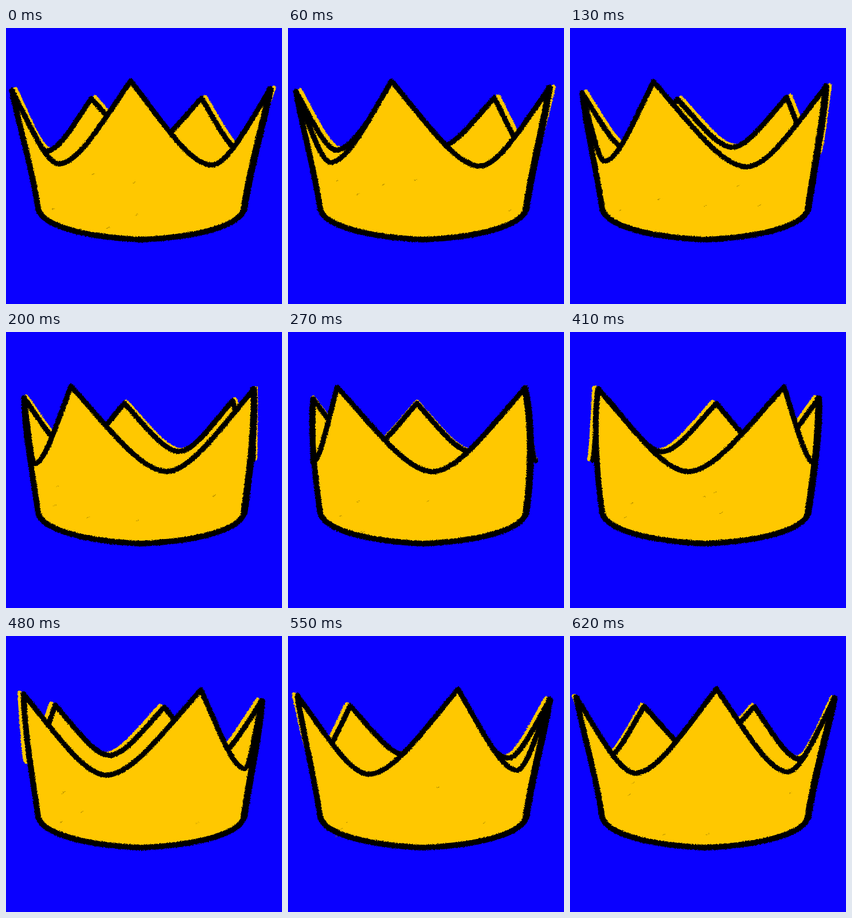
Recreate the animation shown at these times as an HTML page. Size 480 by 480 pixels, loop 680 ms.

```html
<!DOCTYPE html>
<html lang="en">
<head>
<meta charset="utf-8">
<title>Turning crown</title>
<style>
  html, body { margin: 0; width: 100%; height: 100%; overflow: hidden; background: #0a00ff; }
  svg { display: block; width: 100%; height: 100%; }
  path { fill: none; stroke: #000; stroke-width: 9; stroke-linecap: round; stroke-linejoin: round; }
  .gold { fill: #ffc800; stroke: none; }
  #smear { stroke: #ffc800; stroke-width: 8; }
  #skirt { stroke-width: 10; }
  #shade { stroke-width: 12; }
  #specks { stroke: #8a6c00; stroke-width: 0.7; }
</style>
</head>
<body>
<svg viewBox="0 0 480 480">
  <filter id="crayon" x="0" y="0" width="480" height="480" filterUnits="userSpaceOnUse" color-interpolation-filters="sRGB">
    <feTurbulence id="grain" type="fractalNoise" baseFrequency="0.45" numOctaves="2" result="noise"/>
    <feDisplacementMap in="SourceGraphic" in2="noise" scale="4" xChannelSelector="R" yChannelSelector="G"/>
  </filter>
  <rect width="480" height="480" fill="#0a00ff"/>
  <g filter="url(#crayon)">
    <path id="smear"/>
    <path id="backFill" class="gold"/>
    <path id="backRim"/>
    <path id="frontFill" class="gold"/>
    <path id="frontRim"/>
    <path id="skirt"/>
    <path id="shade"/>
    <path id="specks"/>
  </g>
</svg>
<script>
const LOOP = 680;
const STEP = 70;          // time per drawing
const FIRST_CUT = 60;     // the first drawing is shorter
const DRAWINGS = 10;
const PEAKS = 5;
const GAP = 2 * Math.PI / PEAKS;
const CENTER = 235;
const RADIUS = 225;
const RAD = Math.PI / 180;

const el = id => document.getElementById(id);
const mix = (a, b, k) => a + (b - a) * k;
const setPath = (id, d) => el(id).setAttribute('d', d);

function seeded(seed) {
  return () => {
    seed = (seed * 16807 + 11) % 2147483647;
    return seed / 2147483647;
  };
}

// Perspective spreads the near side of the ring and squeezes the far side.
const swing = angle => angle + 0.32 * Math.sin(angle);
const ringX = angle => CENTER + RADIUS * Math.sin(swing(angle));
const nearness = angle => Math.cos(swing(angle));

const peakAt = angle => ({ angle, x: ringX(angle), y: 108 - 16 * nearness(angle) });

function valleyBetween(a, b) {
  const angle = a.angle + GAP / 2;
  return {
    x: mix((a.x + b.x) / 2, ringX(angle), 0.4),
    y: 225 + 18 * nearness(angle)
  };
}

// From one peak down into a round valley and up to the next peak.
function dip(a, b) {
  const v = valleyBetween(a, b);
  const steep = p => [mix(p.x, v.x, 0.36), mix(p.y, v.y, 0.44)];
  const flat = p => [mix(p.x, v.x, 0.72), v.y];
  return `C${steep(a)} ${flat(a)} ${v.x},${v.y}C${flat(b)} ${steep(b)} ${b.x},${b.y}`;
}

// The rim from one peak to another, in turning order.
function rim(peaks, from, to) {
  let d = '';
  for (let i = from; i !== to; i = (i + 1) % PEAKS) {
    d += dip(peaks[i], peaks[(i + 1) % PEAKS]);
  }
  return d;
}

// Side and bottom edges; side is -1 for left, 1 for right.
function edges(tip, side) {
  const at = offset => CENTER + side * offset;
  const corner = `${at(179)},315`;
  const upper = `${(tip.x + at(203)) / 2},${mix(tip.y, 315, 0.27)}`;
  const lower = `${at(189)},245`;
  return {
    down: `C${upper} ${lower} ${corner}`,
    up: `C${lower} ${upper} ${tip.x},${tip.y}`,
    toMiddle: `C${at(171)},345 ${at(95)},364 ${CENTER},368`,
    fromMiddle: `C${at(95)},364 ${at(171)},345 ${corner}`
  };
}

function skirt(from, to) {
  const side = Math.sign(from.x - to.x);
  const start = edges(from, side), end = edges(to, -side);
  return start.down + start.toMiddle + end.fromMiddle + end.up;
}

function specks(random) {
  let d = '';
  for (let i = 0; i < 5; i++) {
    d += `M${mix(80, 390, random())},${mix(250, 350, random())}l4,-2`;
  }
  return d;
}

function drawCrown(index) {
  // Steady turn with a short hesitation late in the loop
  const hold = 3.6 * Math.exp(-(((index - 6.3) / 1.5) ** 2));
  const turn = (hold - 3.5 - 7.2 * index) * RAD;
  const peaks = Array.from({ length: PEAKS }, (_, k) => peakAt(turn + k * GAP));
  const byX = [...peaks].sort((a, b) => a.x - b.x);
  const left = byX[0], right = byX[PEAKS - 1];
  const l = peaks.indexOf(left), r = peaks.indexOf(right);

  const front = `M${left.x},${left.y}${rim(peaks, l, r)}`;
  const back = `M${right.x},${right.y}${rim(peaks, r, l)}`;
  const outline = skirt(right, left);
  const drift = 7 * Math.cos((index - 1) * Math.PI / 6);

  setPath('smear', back);
  el('smear').setAttribute('transform', `translate(${drift} -2)`);
  setPath('backFill', `${back}${skirt(left, right)}Z`);
  setPath('backRim', back);
  setPath('frontFill', `${front}${outline}Z`);
  setPath('frontRim', front);
  setPath('skirt', `M${right.x},${right.y}${outline}`);
  setPath('shade', `M${right.x},${right.y}${edges(right, 1).down}`);
  setPath('specks', specks(seeded(index * 977 + 5)));
  el('grain').setAttribute('seed', index + 1);
}

let shown = -1;
function draw(now) {
  const time = now % LOOP;
  const index = Math.min(DRAWINGS - 1, Math.floor((time + STEP - FIRST_CUT) / STEP));
  if (index !== shown) drawCrown(shown = index);
}

function tick(now) {
  draw(now);
  requestAnimationFrame(tick);
}

draw(0);
requestAnimationFrame(tick);
</script>
</body>
</html>
```
